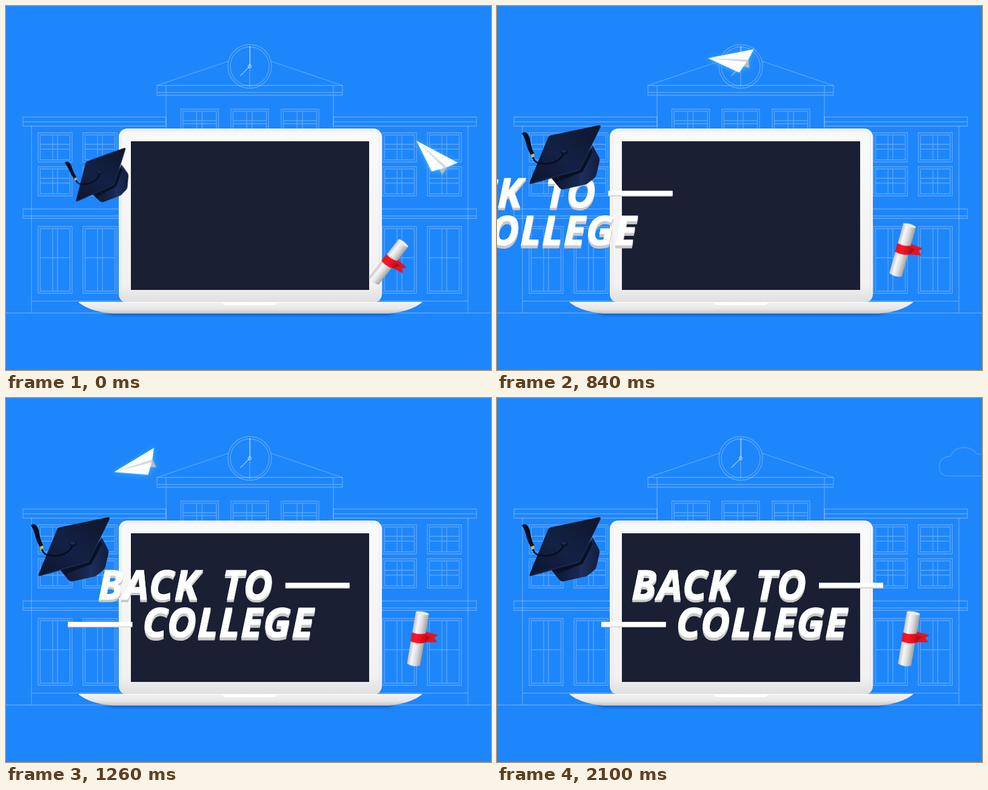
These frames come from a looping animation (800x600 px, 2.17 s). An HTML page:

```html
<!DOCTYPE html>
<html lang="en">
<head>
<meta charset="utf-8">
<title>Back to college</title>
<style>
  html, body { margin: 0; width: 100%; height: 100%; overflow: hidden; background: #1e86fb; }
  svg { display: block; width: 800px; height: 600px; }

  .lines { fill: none; stroke: #fff; stroke-opacity: .27; stroke-width: 1.3; }
  .title {
    font: italic 800 66px "Noto Sans", "Open Sans", sans-serif;
    letter-spacing: 1.5px;
    text-anchor: middle;
  }
  .face  { fill: #fff; stroke: #fff; stroke-width: 1.2px; }
  .depth { fill: #c9c9c9; stroke: #c9c9c9; stroke-width: 1.2px; }

  /* Every part is paused here and advanced by the clock below. */
  .title, .cap, .scroll, .plane, .cloud {
    --ease: cubic-bezier(.333, 0, .667, 1);
    animation: 2100ms var(--ease) both paused;
  }
  .title  { animation-name: slide; animation-duration: 1540ms; }
  .cap    { animation-name: toss; animation-duration: 655ms; }
  .scroll { animation-name: tilt; animation-duration: 1200ms; }
  .plane  { animation-name: fly; filter: drop-shadow(0 1px 4px rgba(70, 205, 255, .65)); }
  .cloud  { animation-name: drift; animation-duration: 630ms; animation-delay: 1470ms; animation-timing-function: linear; }

  @keyframes slide { from { transform: translateX(-804px); } to { transform: translateX(0); } }
  @keyframes drift { from { transform: translateX(76.5px); } to { transform: translateX(0); } }
  @keyframes toss {
    from { transform: translate(197px, 234px) rotate(-8deg) scale(.79); }
    to   { transform: translate(171px, 197px) rotate(0deg) scale(1); }
  }
  @keyframes tilt {
    from { transform: translate(631px, 422px) rotate(38deg) scale(.92); }
    to   { transform: translate(679.5px, 397px) rotate(9.7deg) scale(1); }
  }
  @keyframes fly {
    0%     { transform: translate(677px, 222px) rotate(28deg);    animation-timing-function: cubic-bezier(.33, 0, .67, .46); }
    13.33% { transform: translate(573px, 156px) rotate(16deg);    animation-timing-function: cubic-bezier(.33, .35, .67, .77); }
    26.67% { transform: translate(412px, 86px) rotate(-4.5deg);   animation-timing-function: cubic-bezier(.33, .6, .67, .95); }
    33.33% { transform: translate(381px, 85px) rotate(-7.5deg);   animation-timing-function: cubic-bezier(.33, .07, .67, .5); }
    40%    { transform: translate(348px, 86px) rotate(-11deg);    animation-timing-function: cubic-bezier(.33, .3, .67, .61); }
    53.33% { transform: translate(239px, 98px) rotate(-23.6deg);  animation-timing-function: linear; }
    60%    { transform: translate(178px, 122px) rotate(-31deg);   animation-timing-function: cubic-bezier(.33, .6, .67, 1); }
    73.33% { transform: translate(119px, 167px) rotate(-38deg);   animation-timing-function: cubic-bezier(.33, 0, .67, .33); }
    100%   { transform: translate(-68px, 335px) rotate(-50deg); }
  }
</style>
</head>
<body>
<svg viewBox="0 0 800 600">
  <defs>
    <linearGradient id="lid" x2="0" y2="1">
      <stop offset="0" stop-color="#fafafa"/><stop offset=".9" stop-color="#f1f1f1"/><stop offset="1" stop-color="#dedede"/>
    </linearGradient>
    <linearGradient id="base" x2="0" y2="1">
      <stop offset="0" stop-color="#f2f2f2"/><stop offset=".6" stop-color="#e6e6e6"/><stop offset="1" stop-color="#c4c4c4"/>
    </linearGradient>
    <linearGradient id="paper">
      <stop offset="0" stop-color="#c2c2c2"/><stop offset=".3" stop-color="#f7f7f7"/>
      <stop offset=".6" stop-color="#dcdcdc"/><stop offset="1" stop-color="#a2a2a2"/>
    </linearGradient>
    <linearGradient id="band">
      <stop offset="0" stop-color="#e8121f"/><stop offset=".4" stop-color="#ff1527"/><stop offset="1" stop-color="#d20d1c"/>
    </linearGradient>
    <linearGradient id="board" x1="0" y1="1" x2="1" y2="0">
      <stop offset="0" stop-color="#0d152d"/><stop offset=".45" stop-color="#132145"/><stop offset="1" stop-color="#0e162b"/>
    </linearGradient>
    <linearGradient id="crown">
      <stop offset="0" stop-color="#0d1630"/><stop offset=".55" stop-color="#18284f"/><stop offset=".62" stop-color="#1d305c"/><stop offset="1" stop-color="#111c3c"/>
    </linearGradient>
    <filter id="soft" x="-10%" y="-200%" width="120%" height="500%"><feGaussianBlur stdDeviation="2"/></filter>

    <g id="small">
      <path d="M0 0H56V48H0ZM3.5 3.5H52.5V44.5H3.5ZM24 3.5V44.5M32 3.5V44.5M3.5 19H52.5M3.5 27H52.5"/>
    </g>
    <g id="tall">
      <path d="M0 0H56V110H0ZM3.5 3.5H52.5V106.5H3.5ZM24 3.5V106.5M32 3.5V106.5M3.5 51.5H52.5"/>
    </g>
    <g id="attic">
      <path d="M0 40V0H62V40M3.5 40V3.5H58.5V40M26 3.5V40M35 3.5V40M3.5 19H58.5M3.5 24H58.5"/>
    </g>
    <g id="wing">
      <use href="#small" y="209"/><use href="#small" y="265"/><use href="#tall" y="363.5"/>
    </g>
    <g id="words">
      <text x="306" y="331.5">BACK</text>
      <text x="469" y="331.5">TO</text>
      <text x="437" y="394">COLLEGE</text>
    </g>
  </defs>

  <rect width="800" height="600" fill="#1e86fb"/>

  <g class="lines">
    <path d="M0 506H800M42 198V506M762 198V506M42 486.5H762"/>
    <path d="M28 183H264V198H28ZM28 191H264M540 183H776V198H540ZM540 191H776"/>
    <path d="M28 334.5H776V350H28ZM28 346H776"/>
    <path d="M249 131H555V147H249ZM249 142.5H555M264 131V203M540 131V203"/>
    <path d="M249 131L367 91M437 91L555 131"/>
    <use href="#attic" x="288.5" y="170"/><use href="#attic" x="371" y="170"/><use href="#attic" x="454" y="170"/>
    <use href="#wing" x="53"/><use href="#wing" x="127"/><use href="#wing" x="621"/><use href="#wing" x="695"/>
    <circle cx="402" cy="99.5" r="36"/><circle cx="402" cy="99.5" r="32"/>
    <path d="M402 67V132"/>
    <g stroke-opacity=".5"><path d="M402.5 66V99L386.5 115"/><circle cx="402" cy="99.5" r="2.5"/></g>
  </g>

  <g class="lines cloud">
    <path stroke-opacity=".2" d="M830 128.5H743Q729.5 127 729.5 113Q730 97 748 96Q754 81.5 771 81.5Q785 82 792 93Q814 90 830 110"/>
  </g>

  <g>
    <path d="M160 505H646L630 509H176Z" fill="#0b3f86" opacity=".7" filter="url(#soft)"/>
    <rect x="186" y="202" width="434" height="287" rx="14" fill="url(#lid)"/>
    <rect x="190" y="206" width="426" height="279" rx="11" fill="none" stroke="#e4e4e4"/>
    <rect x="206" y="223" width="393" height="245" fill="#1b1f33"/>
    <path d="M120 488.5H686C678 496 658 505 630 507H176C148 505 128 496 120 488.5Z" fill="url(#base)"/>
    <path d="M120 488.5H686" stroke="#fafafa" stroke-width="1.5"/>
    <path d="M357 488H447Q446 493 441 493H363Q358 493 357 488Z" fill="#fff"/>
  </g>

  <g class="scroll">
    <path d="M9 -14L32 -12L26 -6L33 0L11 4Z" fill="#e01422"/>
    <path d="M9 -8L20 -7L13 4H9Z" fill="#b80c18"/>
    <path d="M-11 -43Q0 -48 11 -43V43Q0 48 -11 43Z" fill="url(#paper)"/>
    <ellipse cy="-43" rx="11" ry="2.5" fill="#eee"/>
    <path d="M-11.5 -9Q0 -6 11.5 -11V5Q0 9 -11.5 6Z" fill="url(#band)"/>
  </g>

  <g class="title">
    <g class="depth">
      <use href="#words" y="1.5"/><use href="#words" y="3"/><use href="#words" y="4.5"/>
    </g>
    <use class="face" href="#words"/>
    <g fill="#d2d2d2"><rect x="531" y="306" width="106" height="8"/><rect x="172" y="370" width="106.5" height="8"/></g>
    <g fill="#fff"><rect x="531" y="304.5" width="106" height="7.5"/><rect x="172" y="369" width="106.5" height="7.5"/></g>
  </g>

  <g class="cap">
    <!-- drawn around the right tip of the board -->
    <g transform="translate(-171 -197)">
      <path d="M90 284L137 262L158 230L168 249Q170 252 169 256L164 278Q163 282 159 285L150 292Q148 294 145 294.5L111 302Q106 303 103 300Z" fill="url(#crown)"/>
      <path d="M137 268L155 235L158 241L141 274L98 290L92 284Z" fill="#0a1126"/>
      <path d="M87 213.5L168 196.5Q172 196 170.5 200L138 268Q136.500 271 133 272L56 293.5Q52.5 294 54 290L84 217Q85 214 87 213.5Z" fill="url(#board)"/>
      <path d="M54.5 292.5L134 270.5Q137 269 138 267L170.5 199" fill="none" stroke="#1e3260" stroke-width="1"/>
      <path d="M110 243C104 257 86 264 66 258Q60 255 59 247" fill="none" stroke="#070c1b" stroke-width="2.5"/>
      <ellipse cx="110.5" cy="240.5" rx="6" ry="4.5" fill="#0b142c"/>
      <ellipse cx="110" cy="239" rx="4" ry="2.5" fill="#1a2b54"/>
      <path d="M41 210Q45 206 49.5 210Q54 214 55 223Q57 236 61.5 243L56 246Q50 236 48 226Q46 217 41 210Z" fill="#0a0f20"/>
      <path d="M56 245L61 243L62 248L57.5 250Z" fill="#d9b24a"/>
    </g>
  </g>

  <g class="plane">
    <path d="M55 24L65 15L64 29Z" fill="#b9bdc3"/>
    <path d="M0 0L65 15L46 33Z" fill="#fff"/>
    <path d="M0 0L65 15L62 18.5Z" fill="#d3d6da"/>
    <path d="M0 0L77 0L65 15Z" fill="#fff"/>
  </g>
</svg>

<script>
  const LOOP = 2170, STEP = 70;
  const parts = document.getAnimations();
  const start = performance.now();

  function draw() {
    const time = (performance.now() - start) % LOOP;
    const held = Math.floor(time / STEP) * STEP;
    for (const part of parts) part.currentTime = held;
    requestAnimationFrame(draw);
  }
  draw();
</script>
</body>
</html>
```
